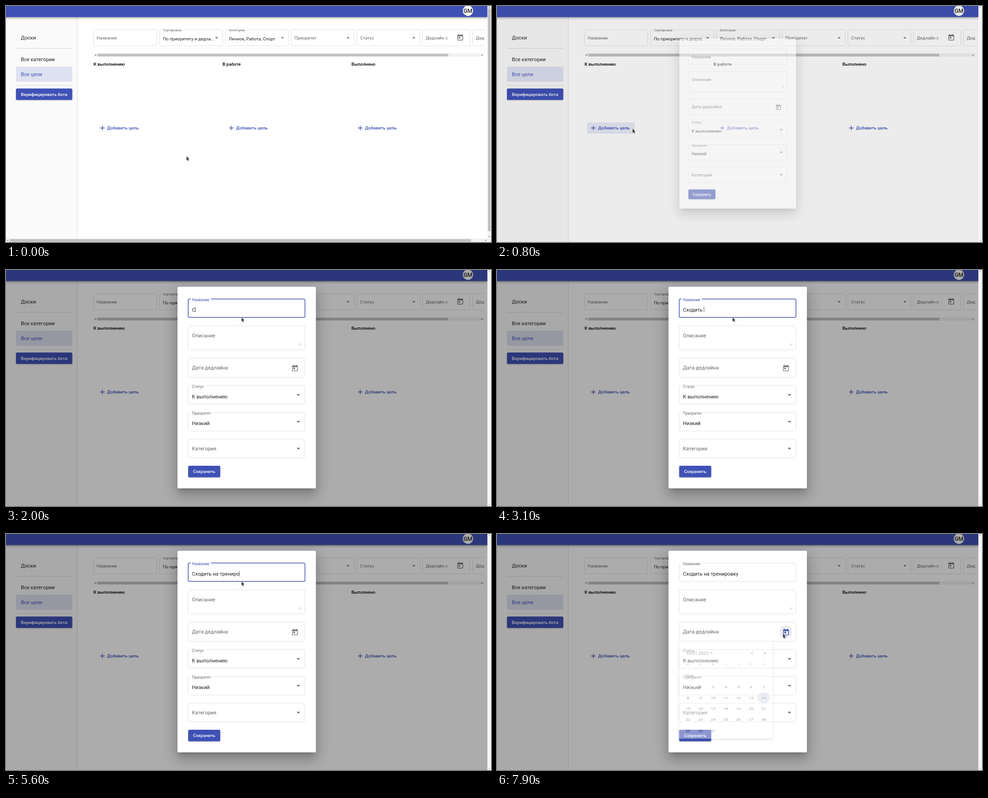
An HTML page that plays this animation: 1072x522 px, repeating every 8 s.

```html
<!DOCTYPE html>
<html lang="ru">
<head>
<meta charset="utf-8">
<title>Доски</title>
<style>
html, body { margin: 0; width: 100%; height: 100%; overflow: hidden; background: #fff; }
#stage { position: relative; width: 1072px; height: 522px; overflow: hidden; }
svg { position: absolute; left: 0; top: 0; width: 1072px; height: 522px; overflow: visible; }
text { font-family: Roboto, sans-serif; white-space: pre; }
#shade { position: absolute; left: 0; top: 0; width: 1064px; height: 522px; background: #000; }
#dialog {
  position: absolute; left: 379px; top: 37px; width: 306px; height: 445.5px;
  background: #fff; border-radius: 2.8px;
  box-shadow: 0 7.7px 10.5px -4.9px rgba(0,0,0,.2), 0 16.8px 26.6px 2.1px rgba(0,0,0,.14), 0 6.3px 32.2px 5.6px rgba(0,0,0,.12);
}
#dialog svg { left: -379px; top: -37px; }
.raised { filter: drop-shadow(0 1.4px 1px rgba(0,0,0,.25)); }
#bar { filter: drop-shadow(0 2px 2.5px rgba(0,0,0,.35)); }
#panel { filter: drop-shadow(0 2px 3px rgba(0,0,0,.3)); }
</style>
</head>
<body>
<div id="stage">
  <svg id="page"></svg>
  <div id="shade"></div>
  <svg id="bars"></svg>
  <div id="dialog"><svg id="form"></svg></div>
  <svg id="top"></svg>
</div>
<script>
const $ = id => document.getElementById(id);
const BLUE = '#3f51b5', GREY = 'rgba(0,0,0,.6)', INK = 'rgba(0,0,0,.87)', LINE = '#e0e0e0';

const text = (x, y, s, size = 9.8, fill = GREY, weight = 400, extra = '') =>
  `<text x="${x}" y="${y}" font-size="${size}" fill="${fill}" font-weight="${weight}" ${extra}>${s}</text>`;
const rect = (x, y, w, h, fill, r = 0, extra = '') =>
  `<rect x="${x}" y="${y}" width="${w}" height="${h}" rx="${r}" fill="${fill}" ${extra}/>`;
const box = (x, y, w, h, extra = '') =>
  rect(x, y, w, h, 'none', 3, `stroke="${LINE}" ${extra}`);
const arrow = (x, y, w) =>
  `<path d="M${x - w} ${y - w / 2}h${2 * w}l${-w} ${w}z" fill="#757575"/>`;
const tick = (x, y, angle, fill = '#505050') =>
  `<path d="M-1.5 1.2L0 -1.2L1.5 1.2z" fill="${fill}" transform="translate(${x} ${y}) rotate(${angle})"/>`;
const dayIcon = (x, y, id = '') =>
  `<path ${id} fill="#757575" transform="translate(${x - 8.4} ${y - 7.7}) scale(.7)" d="M19 3h-1V1h-2v2H8V1H6v2H5a2 2 0 0 0-2 2v14a2 2 0 0 0 2 2h14a2 2 0 0 0 2-2V5a2 2 0 0 0-2-2zm0 16H5V8h14zM7 10h5v5H7z"/>`;
const rule = y => `<path d="M22 ${y}H146.5" stroke="#d6d6d6"/>`;

function sidebar() {
  return rect(0, 0, 157, 522, '#fafafa') + rect(157, 24, 1, 498, '#dcdcdc') +
    text(33, 73.5, 'Доски', 11.2, INK) + rule(93.5) +
    text(33, 121.5, 'Все категории', 11.2, INK) +
    rect(22, 134, 124.5, 33.5, '#dde1f0', 2.5) +
    text(33, 155, 'Все цели', 11.2, BLUE) + rule(175.5) +
    rect(22, 182.5, 124.5, 25.2, BLUE, 2.8, 'class="raised"') +
    text(33, 198.5, 'Верифицировать бота', 9.8, '#fff', 500);
}

function filters() {
  const select = (x, label, value, gap) => box(x, 52.5, 139.5, 35.5) +
    (value
      ? rect(x + 5, 50, gap, 5, '#fff') + text(x + 7.3, 56, label, 7.35) + text(x + 7.3, 76, value, 9.8, INK)
      : text(x + 7.3, 74, label)) +
    arrow(x + 126, 70.7, 3.5);
  return '<clipPath id="strip"><path d="M190 40H1057V120H190z"/></clipPath><g clip-path="url(#strip)">' +
    box(193.5, 52.5, 139.5, 35.5) + text(200.3, 74, 'Название') +
    select(339.5, 'Сортировка', 'По приоритету и дедла...', 45) +
    select(485, 'Категории', 'Личное, Работа, Спорт', 41) +
    select(630.2, 'Приоритет') + select(775.5, 'Статус') +
    box(920.5, 52.5, 105, 36) + text(928, 74, 'Дедлайн с') + dayIcon(1004, 69.2) +
    box(1031.5, 52.5, 105, 36) + text(1038.5, 74, 'Дедлайн по') +
    rect(193.5, 105, 863.5, 7, '#f1f1f1') + rect(202, 105.5, 775.5, 6, '#c1c1c1') +
    tick(197.7, 108.5, -90) + tick(1052.7, 108.5, 90) + '</g>';
}

const column = (x, name) => text(x, 131.5, name, 9.8, '#000', 500) +
  `<path d="M${x + 14.5} 269.8h10m-5 -5v10" stroke="${BLUE}" stroke-width="1.4"/>` +
  text(x + 30, 273.2, 'Добавить цель', 9.8, BLUE, 500);

$('page').innerHTML = rect(0, 0, 1072, 522, '#fff') + sidebar() + filters() +
  rect(199.5, 257.5, 105, 25, BLUE, 2.8, 'id="hover"') +
  column(193.5, 'К выполнению') + column(478.5, 'В работе') + column(763.5, 'Выполнено') +
  rect(-10, -10, 1074, 34.5, BLUE, 0, 'id="bar"') +
  '<circle cx="1021" cy="10.5" r="11.4" fill="#fafafa"/>' +
  text(1021, 15, 'GM', 12.6, '#212121', 500, 'text-anchor="middle"');

$('bars').innerHTML = rect(1064, 0, 8, 522, '#f5f5f5') +
  '<g id="full">' + rect(0, 514.5, 1072, 7.5, '#f1f1f1') +
  rect(8, 515.5, 1020, 6, '#c1c1c1') + rect(1065, 5, 6, 493, '#c1c1c1') +
  tick(3.5, 518.5, -90) + tick(1060.5, 518.5, 90) + tick(1068, 2, 0) + tick(1068, 510, 180) + '</g>' +
  '<g id="idle">' + tick(1068, 2.5, 0, '#a5a5a5') + tick(1068, 518.5, 180, '#a5a5a5') + '</g>';

function form() {
  const field = (y, h, id = '') => box(402.7, y, 258, h, id);
  const select = (y, h, label, value, gap) => field(y, h) +
    (value
      ? rect(408, y - 2, gap, 5, '#fff') + text(411, y + 5, label, 8.4) + text(411, y + 28, value, 11.2, INK)
      : text(411, y + 25.2, label, 11.2)) +
    arrow(646.3, y + 21, 4);
  return field(64.3, 40.5, 'id="name"') + rect(408, 62, 45, 5, '#fff', 0, 'id="gap"') +
    text(411, 88.7, 'Название', 11.2, GREY, 400, 'id="label"') +
    text(411, 92, 'Название', 11.2, 'rgba(0,0,0,.42)', 400, 'id="hint"') +
    text(411, 91.7, '', 11.2, INK, 400, 'id="value"') +
    rect(0, 81.5, .8, 12, '#333', 0, 'id="caret"') +
    field(123.3, 53.5, 'id="about"') + text(411, 148.5, 'Описание', 11.2) +
    '<path d="M648 166.500l5 -5m-2.200 5l2.200 -2.200" stroke="#888" stroke-width=".7"/>' +
    field(195.3, 42, 'id="date"') + text(411, 220.2, 'Дата дедлайна', 11.2) +
    '<circle id="halo" cx="638.800" cy="216.800" r="14" fill="#e9eaef"/>' + dayIcon(638.8, 216.8, 'id="icon"') +
    select(255.5, 41.2, 'Статус', 'К выполнению', 32) +
    select(315, 41.2, 'Приоритет', 'Низкий', 47) +
    select(374.2, 41, 'Категория') +
    rect(402.7, 433, 70.8, 25.5, BLUE, 2.8, 'class="raised"') +
    text(413.5, 449.3, 'Сохранить', 9.8, '#fff', 500);
}
$('form').innerHTML = form();

function calendar() {
  const mid = 'text-anchor="middle"', left = 19.5, step = 27.95;
  let s = rect(0, 0, 207, 248, '#fff', 2.8, 'id="panel"') +
    text(15, 34, '14.01.2023', 9.8, GREY, 500) + arrow(71.5, 30.5, 3.4) +
    '<path d="M163 27l-3.500 3.500l3.500 3.500M187.500 27l3.500 3.500l-3.500 3.500" fill="none" stroke="#757575" stroke-width="1.300"/>' +
    rect(0, 69, 207, .8, '#e0e0e0') + text(15, 91, 'ЯНВ.', 9.1, GREY, 500) +
    `<circle cx="${left + 6 * step}" cy="144" r="13" fill="#d5dcec" stroke="#aab2c4" stroke-width=".7"/>`;
  [...'ВПВСЧПС'].forEach((d, i) => s += text(left + i * step, 61.5, d, 7.7, 'rgba(0,0,0,.45)', 400, mid));
  for (let d = 0; d < 31; d++)
    s += text(left + d % 7 * step, 119.3 + Math.floor(d / 7) * 27.8, d + 1, 9.1, INK, 400, mid);
  return s;
}
$('top').innerHTML = `<g id="calendar">${calendar()}</g>` +
  '<path id="cursor" d="M0 0V9.800L2.200 8L3.800 11.300L5.500 10.500L4 7.300L6.800 7z" fill="#3c3c3c" stroke="#fff" stroke-opacity=".5" stroke-width=".6"/>';

// Pointer path: time, x, y
const path = [
  [0, 399, 332], [100, 393, 329], [200, 370, 317], [300, 338, 296], [400, 312, 279], [500, 302, 273], [600, 299.5, 271],
  [800, 299.5, 271], [900, 432, 211], [1000, 476, 165], [1100, 505, 128], [1200, 518, 110], [1300, 520.5, 104.5],
  [6400, 520.5, 104.5], [6500, 525, 88], [6600, 530, 57], [6700, 528, 90], [6800, 524, 142], [6900, 522.5, 189],
  [7000, 550, 203], [7100, 625, 220], [7200, 675, 225], [7300, 661, 223], [7400, 643, 221], [7500, 632, 220.5]
];
// Typing: time, field content
const typed = [
  [2000, 'С'], [2200, 'Сх'], [2400, 'Схо'], [2600, 'Сход'], [2800, 'Сходи'], [2900, 'Сходит'], [3100, 'Сходить '],
  [3300, 'Сходить н'], [3400, 'Сходить на '], [3500, 'Сходить на тп'], [3700, 'Сходить на тпро'],
  [4000, 'Сходить на тпр'], [4200, 'Сходить на тп'], [4600, 'Сходить на т'], [4800, 'Сходить на тр'],
  [4900, 'Сходить на тре'], [5100, 'Сходить на трен'], [5300, 'Сходить на трени'], [5400, 'Сходить на тренир'],
  [5600, 'Сходить на трениро'], [5700, 'Сходить на трениров'], [5900, 'Сходить на тренировк'], [6000, 'Сходить на тренировку']
];

const ramp = (t, a, b) => Math.min(1, Math.max(0, (t - a) / (b - a)));
const show = (id, on) => $(id).setAttribute('visibility', on ? 'visible' : 'hidden');
const set = (id, attrs) => { for (const k in attrs) $(id).setAttribute(k, attrs[k]); };

function pointer(t) {
  const i = path.findIndex(p => p[0] > t);
  if (i < 0) return path[path.length - 1].slice(1);
  const [a, b] = [path[i - 1], path[i]], k = ramp(t, a[0], b[0]);
  return [a[1] + (b[1] - a[1]) * k, a[2] + (b[2] - a[2]) * k];
}

function draw(t) {
  const open = t >= 800;
  set('cursor', { transform: `translate(${pointer(t)})` });
  set('hover', { opacity: .12 * ramp(t, 300, 500) * (1 - ramp(t, 1000, 1200)) });
  show('full', !open);
  show('idle', open);
  $('shade').style.opacity = !open ? 0 : t < 900 ? .075 : t < 1000 ? .26 : .325;
  $('dialog').style.opacity = !open ? 0 : t < 900 ? .5 : 1;
  $('dialog').style.transform = `scale(${t < 900 ? .843 : t < 1000 ? .998 : 1})`;

  const focus = t >= 1400 && t < 7600, float = ramp(t, 1300, 1500);
  const hoverName = t >= 1200 && t < 1400;
  set('name', { stroke: focus ? BLUE : hoverName ? '#555' : LINE, 'stroke-width': focus ? 1.5 : 1 });
  set('label', { y: 88.7 - 19.7 * float, 'font-size': 11.2 - 2.8 * float, fill: focus ? BLUE : GREY });
  show('gap', float > 0);
  show('hint', t >= 1500 && t < 2000);

  const entry = typed.filter(e => e[0] <= t).pop();
  $('value').textContent = entry ? entry[1] : '';
  set('caret', { x: 411 + (entry ? $('value').getComputedTextLength() : 0) });
  show('caret', t >= 1500 && t < 6500 && !(t >= 4300 && t < 4800));

  set('about', { stroke: t >= 6800 && t < 7000 ? '#777' : LINE });
  set('date', { stroke: t >= 7000 && t < 7700 ? '#777' : LINE });
  show('halo', t >= 7600);
  set('icon', { fill: t >= 7700 ? BLUE : '#757575' });
  set('calendar', { opacity: t >= 7900 ? .4 : 0, transform: 'translate(402.5 237) scale(1 .87)' });
}

function loop() {
  draw(Math.floor(performance.now() % 8000 / 100) * 100);
  requestAnimationFrame(loop);
}
loop();
</script>
</body>
</html>
```
